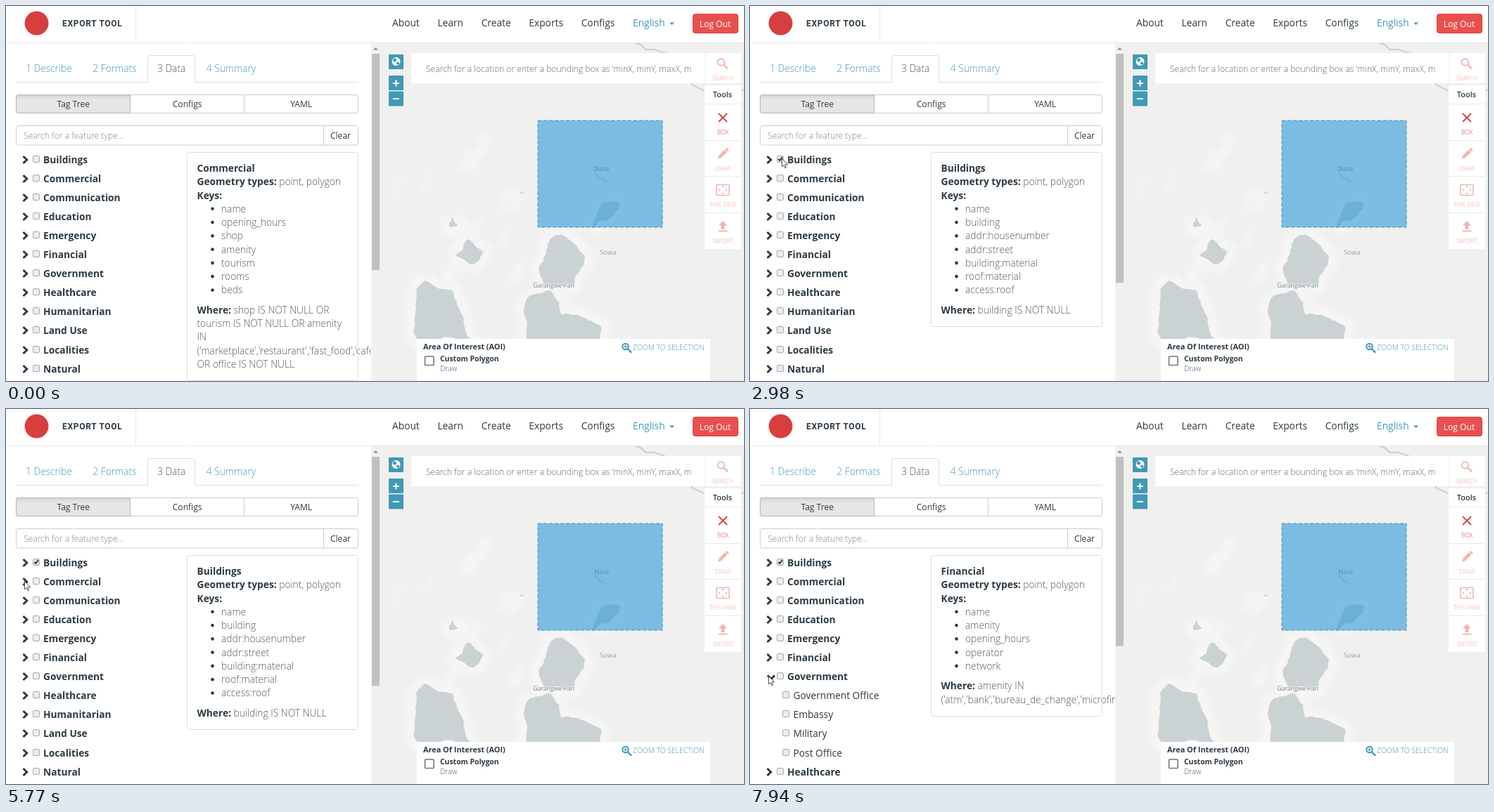
These frames come from a looping animation (1049x534 px, 8000 ms). An HTML page with a canvas:

```html
<!DOCTYPE html>
<html lang="en">
<head>
<meta charset="utf-8">
<title>Export tool</title>
<style>
html, body { margin: 0; width: 100%; height: 100%; overflow: hidden; background: #fff; }
canvas, svg { position: absolute; left: 0; top: 0; }
text { font-family: "Open Sans", sans-serif; }
</style>
</head>
<body>
<canvas id="base" width="1049" height="534"></canvas>
<svg id="labels" width="1049" height="534">
  <clipPath id="pane"><rect y="53" width="518.5" height="481"/></clipPath>
</svg>
<canvas id="live" width="1049" height="534"></canvas>
<script>
const LOOP = 8000;
const INK = '#2c3a43', SOFT = '#4c5a63', TEAL = '#4797b5', RED = '#d9403f', PINK = '#efb7b2';
const BODY = 13.75, SMALL = 12.1, TINY = 10.4;
const base = document.getElementById('base').getContext('2d');
const live = document.getElementById('live').getContext('2d');
const svg = document.getElementById('labels');
const NS = svg.namespaceURI;

// ---------- shapes ----------
function rect(c, x, y, w, h, fill, stroke, r = 0, width = 1) {
  c.beginPath();
  c.roundRect(x, y, w, h, r);
  if (fill) { c.fillStyle = fill; c.fill(); }
  if (stroke) { c.strokeStyle = stroke; c.lineWidth = width; c.stroke(); }
}
function trace(c, pts) {
  c.beginPath();
  for (let i = 0; i < pts.length; i += 2) c.lineTo(pts[i], pts[i + 1]);
}
function line(c, pts, color, width = 1) {
  trace(c, pts);
  c.strokeStyle = color;
  c.lineWidth = width;
  c.stroke();
}
function poly(c, pts, fill) {
  trace(c, pts);
  c.closePath();
  c.fillStyle = fill;
  c.fill();
}
function disc(c, x, y, r, fill) {
  c.beginPath();
  c.arc(x, y, r, 0, 2 * Math.PI);
  c.fillStyle = fill;
  c.fill();
}
// Draw around a local origin, optionally turned
function at(c, x, y, turn, draw) {
  c.save();
  c.translate(x, y);
  c.rotate(turn);
  draw();
  c.restore();
}
const across = (c, x, y, r, color, w) => line(c, [x - r, y, x + r, y], color, w);
function plus(c, x, y, r, color, w) {
  across(c, x, y, r, color, w);
  line(c, [x, y - r, x, y + r], color, w);
}
function lens(c, x, y, r, color) {
  c.beginPath();
  c.arc(x, y, r, 0, 2 * Math.PI);
  c.strokeStyle = color;
  c.lineWidth = 2;
  c.stroke();
  line(c, [x + r * .7, y + r * .7, x + r * 2, y + r * 2], color, 2.4);
}
let seed = 11;
const random = () => (seed = seed * 16807 % 2147483647) / 2147483647;

// Roughen a line by pushing edge midpoints sideways
function rough(pts, depth = 3) {
  if (!depth) return pts;
  const out = pts.slice(0, 2);
  for (let i = 2; i < pts.length; i += 2) {
    const [x, y, u, v] = pts.slice(i - 2, i + 2), push = (random() - .4) * .26;
    out.push((x + u) / 2 + (v - y) * push, (y + v) / 2 - (u - x) * push, u, v);
  }
  return rough(out, depth - 1);
}

// ---------- text ----------
function group(clip) {
  const g = document.createElementNS(NS, 'g');
  if (clip) g.setAttribute('clip-path', `url(#${clip})`);
  return svg.appendChild(g);
}
function node(parent, tag, str, attrs) {
  const el = document.createElementNS(NS, tag);
  for (const k in attrs) el.setAttribute(k, attrs[k]);
  el.textContent = str;
  return parent.appendChild(el);
}
function text(g, x, y, str, size, weight = 400, fill = INK, more = {}) {
  return node(g, 'text', str, { x, y, 'font-size': size, 'font-weight': weight, fill, ...more });
}
const centred = { 'text-anchor': 'middle' };

// Words in a row with an even gap
function menu(g, x, y, words, gap, weight, color) {
  const el = text(g, x, y, '', BODY, weight);
  words.forEach((word, i) => node(el, 'tspan', word, { dx: i ? gap : 0, fill: color(word) }));
}
// Bold lead-in followed by light text
function pair(g, x, y, lead, rest) {
  node(text(g, x, y, lead, BODY, 700), 'tspan', ' ' + rest, { 'font-weight': 300, fill: SOFT });
}

// ---------- map ----------
const LAKES = [
  [596, 391, 634, 405, 646, 436, 660, 478, 587, 478, 582, 440, 583, 405],
  [783, 326, 823, 357, 806, 400, 767, 399, 757, 372, 768, 351],
  [745, 412, 775, 406, 790, 440, 822, 444, 847, 459, 842, 480, 738, 480, 739, 445],
  [657, 332, 679, 350, 664, 368, 639, 355],
  [634, 300, 642, 312, 630, 314],
  [832, 317, 846, 284, 873, 280, 862, 299]
];

function drawMap(c) {
  const water = '#cad2d3', pale = '#f5f5f4', road = '#c9c9cc';
  const shores = LAKES.map(p => rough([...p, p[0], p[1]]));
  c.save();
  c.beginPath();
  c.rect(532, 53, 517, 481);
  c.clip();
  rect(c, 532, 53, 517, 481, '#f0f0ef');

  c.filter = 'blur(4px)';
  c.lineJoin = 'round';
  shores.forEach(p => line(c, p, pale, 26));
  for (let i = 0; i < 14; i++) {
    const x = 550 + 180 * random(), y = 210 + 210 * random();
    line(c, rough([x, y, x + 12, y - 30]), pale, 6 + 10 * random());
  }
  c.filter = 'none';

  shores.forEach(p => poly(c, p, water));
  disc(c, 733, 265.5, 1.8, water);
  line(c, rough([836, 233, 853, 252]), '#bcc5c8', 1.3);
  line(c, rough([893, 52, 930, 65, 975, 112, 1000, 122], 2), road, 1.8);
  line(c, [1043, 121, 1049, 119], road, 1.8);

  rect(c, 756, 163, 177, 152, 'rgba(48,154,219,.6)');
  c.setLineDash([5, 3]);
  rect(c, 756, 163, 177, 152, null, '#3394c8');
  c.restore();
}

function drawMapControls(c) {
  const blue = '#4099b6', toolX = 1019;
  for (const y of [69, 99, 121.5]) rect(c, 544, y, 21, 21, blue, null, 1);
  disc(c, 554.5, 79, 6, '#fff');
  disc(c, 552.5, 77, 2.5, blue);
  disc(c, 557, 81.5, 2, blue);
  plus(c, 554.5, 110, 4.5, '#fff', 2);
  across(c, 554.5, 132, 4.5, '#fff', 2);

  rect(c, 576, 67, 469, 43, '#fff');
  line(c, [993.5, 67, 993.5, 110], '#eee');
  rect(c, 993, 113, 52, 233, '#fff');
  for (let i = 0; i < 4; i++) across(c, toolX, Math.round(139 + 51.6 * i) + .5, 26, '#e9e9e9');

  lens(c, 1016.5, 80, 4.8, PINK);
  at(c, toolX, 159, Math.PI / 4, () => plus(c, 0, 0, 8.5, RED, 1.8));
  at(c, toolX, 210.5, Math.PI / 4, () => {
    rect(c, -2.5, -10, 5, 3, PINK);
    rect(c, -2.5, -6, 5, 12, PINK);
    poly(c, [-2.5, 6, 2.5, 6, 0, 10], PINK);
  });
  rect(c, 1010, 254.5, 18, 15, null, PINK, 1, 1.6);
  for (let i = 0; i < 4; i++)
    at(c, toolX, 262, i * Math.PI / 2, () => poly(c, [4, -2, 6.5, 0, 4, 2], PINK));
  poly(c, [toolX - 6, 312.5, toolX, 306, toolX + 6, 312.5], PINK);
  rect(c, toolX - 2.5, 312, 5, 6, PINK);
  across(c, toolX, 320.5, 6, PINK, 2);

  rect(c, 584, 474, 417, 60, '#fff');
  rect(c, 595.5, 499, 12.5, 12.5, '#fff', '#6f767a', 1, 1.6);
  lens(c, 880.5, 485, 4.3, TEAL);
  plus(c, 880.5, 485, 2.5, TEAL, 1.2);
}

// ---------- page ----------
function drawPage(c) {
  rect(c, 0, 0, 1049, 534, '#fff');
  drawMap(c);
  drawMapControls(c);

  line(c, [0, 52.5, 1049, 52.5], '#e7e7e7');
  line(c, [184.5, 0, 184.5, 52], '#e7e7e7');
  disc(c, 43.5, 24.5, 17, '#d73f3f');
  rect(c, 976.5, 11.5, 64, 27, '#e8504f', '#dc3d3c', 3);
  poly(c, [943, 23.5, 950, 23.5, 946.5, 27], TEAL);

  line(c, [14, 108.5, 501, 108.5], '#ddd');
  rect(c, 201.5, 70.5, 67, 40, '#fff', '#ddd', 3);
  rect(c, 200, 109, 70, 3, '#fff');
  line(c, [202, 108.5, 268, 108.5], '#fff');

  rect(c, 14.5, 126.5, 486, 26, '#fff', '#ccc', 3);
  const shade = c.createLinearGradient(0, 126, 0, 133);
  shade.addColorStop(0, '#d2d2d2');
  shade.addColorStop(1, '#e6e6e6');
  rect(c, 14.5, 126.5, 162, 26, shade, '#b5b5b5', [3, 0, 0, 3]);
  line(c, [338.5, 126, 338.5, 153], '#ccc');

  rect(c, 14.5, 170.5, 486, 27.5, '#fff', '#ccc', 3);
  line(c, [451.5, 170, 451.5, 198], '#ccc');

  rect(c, 519, 53, 13, 481, '#f1f1f1');
  poly(c, [522, 62.5, 525.5, 59, 529, 62.5], '#8a8a8a');
}

function addLabels() {
  const g = group();
  text(g, 80, 29, 'EXPORT TOOL', 12, 600, INK, { style: 'font-family:Roboto,sans-serif;letter-spacing:.7px' });
  menu(g, 549, 29, ['About', 'Learn', 'Create', 'Exports', 'Configs', 'English'], 25.7, 400,
    word => word === 'English' ? TEAL : INK);
  text(g, 1008, 29.5, 'Log Out', SMALL, 400, '#fff', centred);
  menu(g, 28, 94, ['1 Describe', '2 Formats', '3 Data', '4 Summary'], 29.5, 300,
    word => word === '3 Data' ? SOFT : TEAL);
  ['Tag Tree', 'Configs', 'YAML'].forEach((s, i) => text(g, 95.7 + 162 * i, 144, s, SMALL, 400, INK, centred));
  text(g, 25, 189, 'Search for a feature type...', SMALL, 300, '#858585');
  text(g, 475.5, 188.5, 'Clear', SMALL, 400, INK, centred);

  text(g, 597, 93.5, "Search for a location or enter a bounding box as 'minX, minY, maxX, m", SMALL, 300, '#6b6b6b');
  text(g, 1018.5, 130, 'Tools', 11, 600, INK, centred);
  text(g, 1019, 106, 'SEARCH', 8.3, 300, '#eba59f', centred);
  ['BOX', 'DRAW', 'THIS VIEW', 'IMPORT'].forEach((s, i) =>
    text(g, 1019, 183 + 51.6 * i, s, 8.3, 300, i ? '#eba59f' : RED, centred));

  const halo = { ...centred, stroke: '#f2f2f1', 'stroke-width': 2, 'paint-order': 'stroke' };
  text(g, 846.5, 235, 'Nata', 9.5, 400, '#4f91b8', centred);
  text(g, 856, 354, 'Sowa', 9.7, 400, '#999c9e', halo);
  text(g, 778.5, 400.5, 'Garangwe Pan', 8.7, 400, '#858b8e', halo);

  text(g, 593, 489, 'Area Of Interest (AOI)', 10.9, 700);
  text(g, 617, 506, 'Custom Polygon', TINY, 700);
  text(g, 617, 520, 'Draw', TINY, 300, SOFT);
  text(g, 891, 490, 'ZOOM TO SELECTION', TINY, 300, TEAL);
}

// ---------- tree ----------
const TOPICS = ['Buildings', 'Commercial', 'Communication', 'Education', 'Emergency', 'Financial',
  'Government', 'Healthcare', 'Humanitarian', 'Land Use', 'Localities', 'Natural'];
const CHILDREN = {
  Commercial: ['Shop', 'Supermarket', 'Restaurant', 'Tourism', 'Accommodation'],
  Government: ['Government Office', 'Embassy', 'Military', 'Post Office']
};
const rowY = i => Math.round(219 + 27.05 * i);

function makeTree(open) {
  const children = CHILDREN[open] || [];
  const rows = TOPICS.flatMap(name => [
    { name, open: name === open },
    ...(name === open ? children.map(name => ({ name, child: true })) : [])
  ]).slice(0, TOPICS.length);
  const g = group();
  rows.forEach((r, i) => text(g, r.child ? 61.5 : 53, rowY(i) + 5, r.name, BODY, r.child ? 400 : 700));
  return { g, rows, extra: children.length };
}

function drawTree(c, rows, checked) {
  rows.forEach((r, i) => {
    const y = rowY(i), x = r.child ? 46.5 : 38.5;
    const chevron = () => line(c, [-2.6, -5, 2.6, 0, -2.6, 5], INK, 3);
    if (!r.child) at(c, r.open ? 30 : 27.1, r.open ? y + 1 : y, r.open ? Math.PI / 2 : 0, chevron);
    rect(c, x, y - 5.5, 9, 9, '#ececec', '#a9a9a9', 1.5);
    if (i === 0 && checked) line(c, [x + 1.8, y - 1.2, x + 3.8, y + 1, x + 7.5, y - 3.8], '#333', 1.9);
  });
}

// ---------- detail card ----------
function makeCard(title, keys, where) {
  const g = group('pane'), left = 271.5;
  let y = 231;
  const next = () => Math.round(y += 19.27) + 5;
  text(g, left, y + 5, title, BODY, 700);
  pair(g, left, next(), 'Geometry types:', 'point, polygon');
  text(g, left, next(), 'Keys:', BODY, 700);
  const dots = keys.map(key => {
    text(g, 306, next(), key, BODY, 300, SOFT);
    return y;
  });
  y += 9.1;
  where.forEach((s, i) => {
    if (i === 0) pair(g, left, next(), 'Where:', s);
    else text(g, left, next(), s, BODY, 300, SOFT);
  });
  const overflow = where.some(s => s.length > 40);
  return { g, dots, overflow, bottom: Math.round(y + 23) + .5 };
}

function drawCard(c, card) {
  rect(c, 257.5, 208.5, 243, card.bottom - 208.5, null, '#ddd', 3);
  card.dots.forEach(y => disc(c, 293.5, y, 2.3, INK));
}

// A card that overflows adds a sideways scrollbar, which shortens the view
function drawThumb(c, tree, card) {
  const view = card.overflow ? 468 : 481, content = 671 + 24 * tree.extra;
  rect(c, 520, 68, 11, (view - 26) * view / content, '#c1c1c1');
}

// ---------- timeline ----------
drawPage(base);
addLabels();

const trees = { closed: makeTree(), commercial: makeTree('Commercial'), government: makeTree('Government') };
const cards = {
  commercial: makeCard('Commercial',
    ['name', 'opening_hours', 'shop', 'amenity', 'tourism', 'rooms', 'beds'],
    ['shop IS NOT NULL OR', 'tourism IS NOT NULL OR amenity', 'IN',
      "('marketplace','restaurant','fast_food','cafe')", 'OR office IS NOT NULL']),
  buildings: makeCard('Buildings',
    ['name', 'building', 'addr:housenumber', 'addr:street', 'building:material', 'roof:material', 'access:roof'],
    ['building IS NOT NULL']),
  financial: makeCard('Financial',
    ['name', 'amenity', 'opening_hours', 'operator', 'network'],
    ['amenity IN', "('atm','bank','bureau_de_change','microfinance')"])
};

const cardAt = t => t < 1990 ? 'commercial' : t < 7250 ? 'buildings' : 'financial';
const treeAt = t => t >= 7940 ? 'government' : t >= 4450 && t < 5770 ? 'commercial' : 'closed';

// Pointer path: start, end, x, y; it advances in ticks
const TICK = 77, ENTRY = [937, 525];
const MOVES = [
  [590, 810, 623, 411],
  [1110, 1370, 246, 309],
  [1660, 1990, 69, 227],
  [2060, 2440, 47, 221],
  [2520, 2600, 45, 217],
  [3670, 4220, 26, 245],
  [6400, 7250, 38, 362],
  [7330, 7710, 26, 380]
];
const PRESSES = [2830, 4300, 5620, 7790], HOLD = 150;

const smooth = p => p * p * (3 - 2 * p);

function pointer(t) {
  let [x, y] = ENTRY;
  for (const [start, end, toX, toY] of MOVES) {
    if (t < start) break;
    const last = Math.round((end - start) / TICK);
    const tick = t >= end ? last : Math.floor((t - start) / (end - start) * last);
    const e = smooth((tick + 1) / (last + 1));
    x = Math.round(x + (toX - x) * e);
    y = Math.round(y + (toY - y) * e);
  }
  return [x, y];
}

function drawPointer(c, t) {
  const [x, y] = pointer(t);
  if (PRESSES.some(p => t >= p && t < p + HOLD)) disc(c, x, y + .5, 10, 'rgba(255,255,0,.47)');
  at(c, x + .4, y + .4, 0, () => {
    const arrow = [0, 0, 0, 11.5, 2.7, 9.1, 4.5, 13.2, 6.3, 12.4, 4.6, 8.5, 8.2, 8.3, 0, 0];
    poly(c, arrow, '#fff');
    line(c, arrow, '#3a3a3a', .9);
  });
}

function show(set, name) {
  for (const k in set) set[k].g.style.display = k === name ? '' : 'none';
  return set[name];
}

function frame(t) {
  const card = show(cards, cardAt(t)), tree = show(trees, treeAt(t));
  live.clearRect(0, 0, 1049, 534);
  drawThumb(live, tree, card);
  drawTree(live, tree.rows, t >= PRESSES[0] + HOLD);
  drawCard(live, card);
  if (t >= MOVES[0][0]) drawPointer(live, t);
}

const begin = performance.now();
function tick() {
  frame((performance.now() - begin) % LOOP);
  requestAnimationFrame(tick);
}
tick();
</script>
</body>
</html>
```
